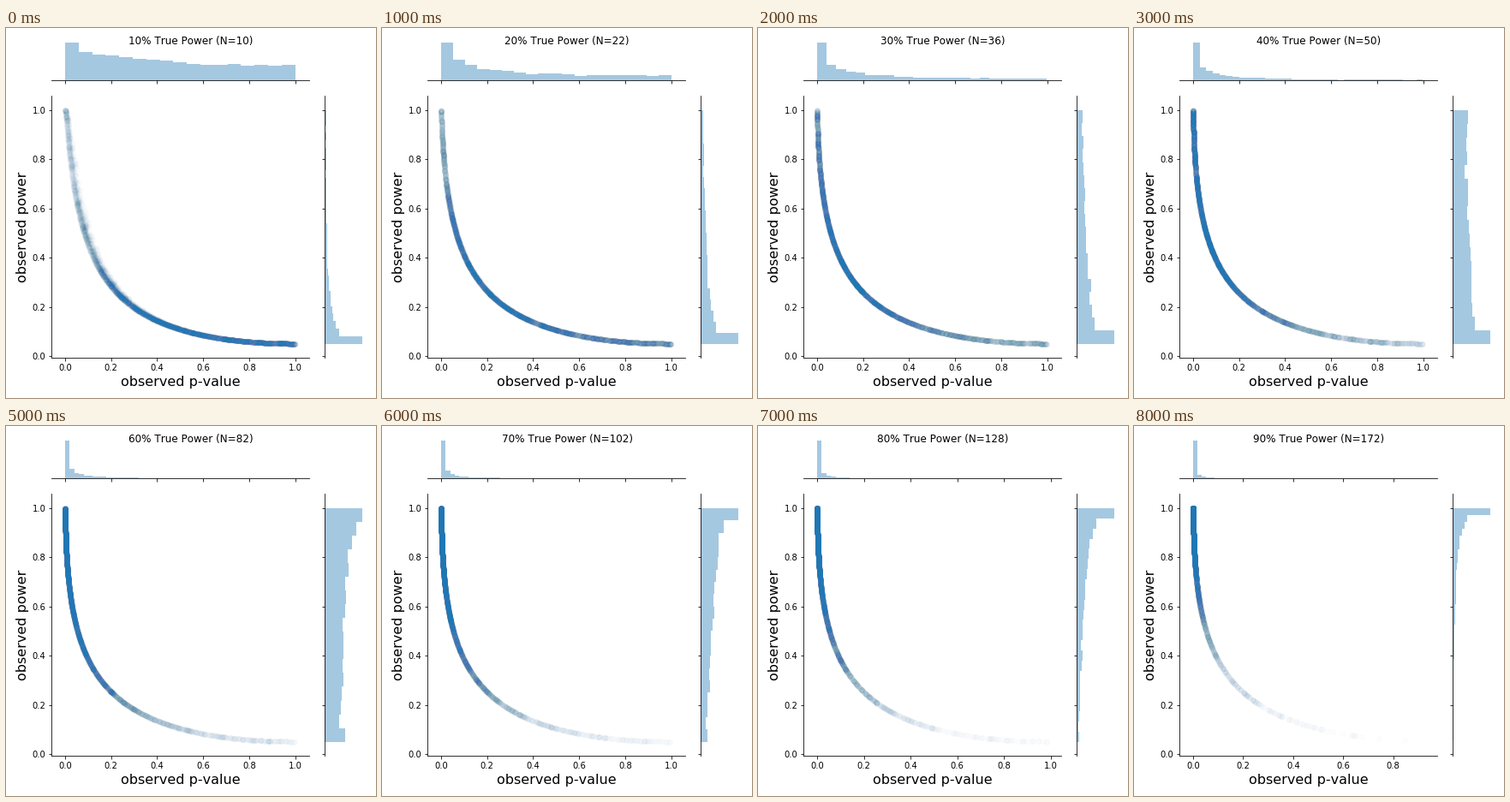
Write a matplotlib script that moves like this. It is 432 px wide and 432 px high and loops after 9 s.

```python
import math

import numpy as np
import matplotlib.pyplot as plt
from matplotlib.animation import FuncAnimation

SIZE, DPI = 432, 72
RUNS, EFFECT, ALPHA = 5000, 0.5, 0.05
GROUP = [5, 11, 18, 25, 32, 41, 51, 64, 86]    # people per group
P_MAX = [1, 1, 1, 1, 1, 1, 1, 0.985, 0.92]     # largest p-value of each run
BLUE = "C0"

plt.rcParams.update({"font.family": "DejaVu Sans", "font.size": 10,
                     "text.kerning_factor": 6})

erf = np.vectorize(math.erf)
NODES, WEIGHTS = np.polynomial.legendre.leggauss(64)


def norm_cdf(x):
    return 0.5 * (1 + erf(x / math.sqrt(2)))


def cos_integral(theta, power):
    """Integral of cos(u)**power from 0 to theta."""
    theta, power = np.broadcast_arrays(theta, power)
    u = theta[..., None] * (NODES + 1) / 2
    return theta / 2 * (np.cos(u) ** power[..., None] @ WEIGHTS)


def t_pvalue(t, df):
    """Two-sided p-value of Student's t."""
    theta = np.arctan(np.abs(t) / np.sqrt(df))
    half = cos_integral(np.full_like(theta, math.pi / 2), df - 1)
    return np.clip(1 - cos_integral(theta, df - 1) / half, 0, 1)


def t_power(t, df):
    """Power of a two-sided t-test whose noncentrality is |t|."""
    grid = np.linspace(0, 4, 801)
    crit = np.interp(-ALPHA, -t_pvalue(grid, np.full_like(grid, df)), grid)
    s = np.linspace(0.01, 3.2, 220)
    logw = (df - 1) * np.log(s) - df * s**2 / 2
    w = np.exp(logw - logw.max())
    w /= w.sum()
    nc = np.linspace(0, 14, 160)[:, None]
    table = (norm_cdf(nc - crit * s) + norm_cdf(-nc - crit * s)) @ w
    return np.interp(np.abs(t), nc[:, 0], table)


def simulate(k):
    """Observed p-values (Welch) and observed power of many experiments."""
    n = GROUP[k]
    rng = np.random.default_rng(40 + k)
    a = rng.normal(EFFECT, 1, (RUNS, n))
    b = rng.normal(0, 1, (RUNS, n))
    diff = a.mean(1) - b.mean(1)
    va, vb = a.var(1, ddof=1), b.var(1, ddof=1)
    df = (n - 1) * (va + vb) ** 2 / (va**2 + vb**2)
    p = t_pvalue(diff / np.sqrt((va + vb) / n), df)
    # The effect size uses the population standard deviation.
    d = diff / np.sqrt((a.var(1) + b.var(1)) / 2)
    power = t_power(d * math.sqrt(n / 2), 2 * n - 2)
    keep = p <= P_MAX[k]
    return p[keep], power[keep]


def histogram(x):
    """Freedman-Diaconis bins, at most 50, scaled to a peak of 1."""
    q1, q3 = np.percentile(x, [25, 75])
    width = 2 * (q3 - q1) / len(x) ** (1 / 3)
    bins = min(math.ceil((x.max() - x.min()) / width), 50)
    counts, edges = np.histogram(x, bins)
    return counts / counts.max(), edges


def add_axes(left, top, right, bottom, **kw):
    box = [left, SIZE - bottom, right - left, bottom - top]
    return fig.add_axes([v / SIZE for v in box], **kw)


fig = plt.figure(figsize=(SIZE / DPI, SIZE / DPI), dpi=DPI, facecolor="white")
joint = add_axes(53.4, 79.2, 354.4, 385.2)
top = add_axes(53.4, 14.8, 354.4, 61.2, sharex=joint)
side = add_axes(372.4, 79.2, 418.2, 385.2, sharey=joint)

joint.spines[["top", "right"]].set_visible(False)
top.spines[["top", "right", "left"]].set_visible(False)
side.spines[["top", "right", "bottom"]].set_visible(False)
top.tick_params(left=False, labelleft=False, labelbottom=False)
side.tick_params(bottom=False, labelleft=False, labelbottom=False)
joint.set_xlabel("observed p-value", fontsize=16)
joint.set_ylabel("observed power", fontsize=16)

title = fig.suptitle("", fontsize=12)
dots = joint.scatter([], [], s=36, color=BLUE, alpha=0.01)
bars = dict(fill=True, color=BLUE, alpha=0.4)
top_bars = top.stairs([1], [0, 1], **bars)
side_bars = side.stairs([1], [0, 1], orientation="horizontal", **bars)

joint.set_ylim(-0.00784, 1.0587)
top.set_ylim(0, 1.05)
side.set_xlim(0, 1.05)

data = [simulate(k) for k in range(len(GROUP))]


def update(k):
    p, power = data[k]
    title.set_text(f"{10 * (k + 1)}% True Power (N={2 * GROUP[k]})")
    dots.set_offsets(np.column_stack([p, power]))
    top_bars.set_data(*histogram(p))
    side_bars.set_data(*histogram(power))
    joint.set_xlim(-0.0583 * P_MAX[k], 1.0627 * P_MAX[k])
    return dots, top_bars, side_bars, title


anim = FuncAnimation(fig, update, frames=len(GROUP), interval=1000,
                     init_func=lambda: update(0), repeat=True, repeat_delay=0)
plt.show()
```
